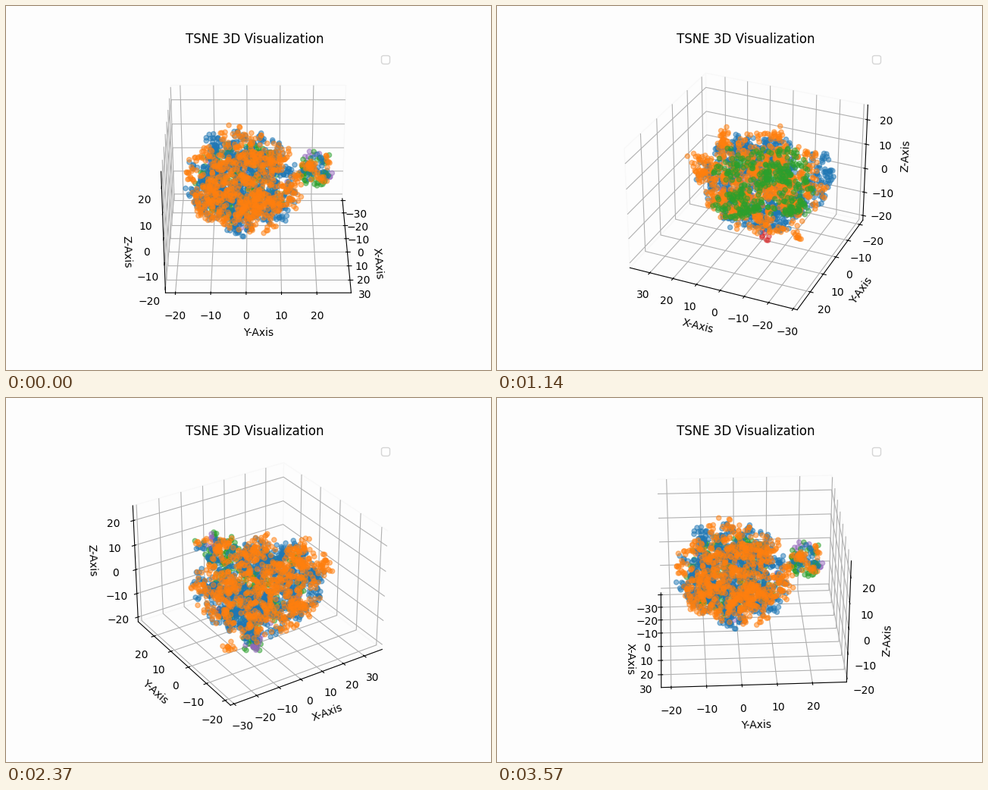
A matplotlib script that plays this animation: 640 by 480 pixels, repeating every 3600 ms.

```python
import matplotlib.pyplot as plt
import numpy as np
from matplotlib.animation import FuncAnimation

FRAMES, INTERVAL = 120, 30
PAPER = "#fdfdfd"
BLUE, ORANGE, GREEN, RED, PURPLE = "C0", "C1", "C2", "C3", "C4"

CENTRE = np.array([0, -1, 1.5])
RADII = np.array([26, 16.5, 16.5])
LOBE = (-1.5, 20, 6)
LOW = (-9.5, -8.5, -12)

rng = np.random.default_rng(4)


def in_ball(n):
    v = rng.normal(size=(n, 3))
    v /= np.linalg.norm(v, axis=1, keepdims=True)
    return v * rng.random((n, 1)) ** (1 / 3)


def clumps(count, centre, radii):
    """Small groups of neighbouring points that fill an ellipsoid."""
    starts = centre + in_ball(count) * radii
    points = np.repeat(starts, rng.integers(2, 6, count), axis=0)
    return points + rng.normal(size=points.shape) * (1.2, 0.8, 0.9)


def make_clouds():
    clouds = {c: [] for c in (BLUE, ORANGE, GREEN, PURPLE, RED)}

    def add(colour, count, centre, radii):
        clouds[colour].append(clumps(count, centre, radii))

    # main body: green and purple stay nearer the middle
    for colour, count, size in ((BLUE, 235, 1), (ORANGE, 205, 1.03),
                                (GREEN, 85, 0.78), (PURPLE, 20, 0.85)):
        add(colour, count, CENTRE, RADII * size)

    # side lobe and the patch underneath
    for colour, count in ((GREEN, 20), (ORANGE, 13), (BLUE, 9), (PURPLE, 3)):
        add(colour, count, LOBE, (8, 5, 5))
    for colour, count in ((GREEN, 10), (PURPLE, 4)):
        add(colour, count, LOW, (4, 4, 3))
    add(RED, 2, (-8, 10, -12), (1, 1, 1))

    # upright strands on the rim
    for colour, angle in ((ORANGE, -30), (ORANGE, 15), (BLUE, 214)):
        a = np.radians(angle)
        rim = CENTRE + RADII * (np.cos(a), np.sin(a), 0.3)
        add(colour, 9, rim, (2, 1.5, 7))

    # loose ends above and below
    for tip in ((-3.5, -2, 19.5), (-14.7, -1, -17)):
        add(ORANGE, 3, tip, (1, 1, 2))

    return {c: np.vstack(parts) for c, parts in clouds.items()}


def rank(colour, azim):
    """Drawing height: green and blue come to the front on their own side."""
    def facing(side):
        return np.cos(np.radians(azim - side)) - 0.75

    return {
        ORANGE: 0,
        GREEN: facing(95),
        BLUE: max(facing(180), -0.6),
        PURPLE: -1,
        RED: -2,
    }[colour]


fig = plt.figure(figsize=(6.4, 4.8), dpi=100, facecolor=PAPER)
ax = fig.add_subplot(projection="3d", computed_zorder=False)
ax.set_facecolor("none")
ax.set_title("TSNE 3D Visualization")
ax.set(xlabel="X-Axis", ylabel="Y-Axis", zlabel="Z-Axis")

scatters = {
    colour: ax.scatter(*points.T, color=colour, alpha=0.5)
    for colour, points in make_clouds().items()
}

ax.set(xlim=(-31.6, 38.7), ylim=(-22.8, 29.7), zlim=(-22, 25.9))
ax.set_xticks(range(-30, 31, 10))
ax.set_yticks(range(-20, 21, 10))
ax.set_zticks(range(-20, 21, 10))
for axis in (ax.xaxis, ax.yaxis, ax.zaxis):
    axis.set_pane_color(PAPER)
    axis.pane.set_edgecolor("#f8f8f8")
ax.legend(handles=[], loc="upper right")


def update(i):
    # the tiny offset keeps the walls well defined when seen edge-on
    azim = i * 360 / FRAMES + 0.01
    ax.view_init(elev=30, azim=azim)
    for colour, cloud in scatters.items():
        cloud.set_zorder(2 + rank(colour, azim) / 10)
    return list(scatters.values())


anim = FuncAnimation(fig, update, frames=FRAMES, interval=INTERVAL,
                     init_func=lambda: update(0), repeat=True)
plt.show()
```
